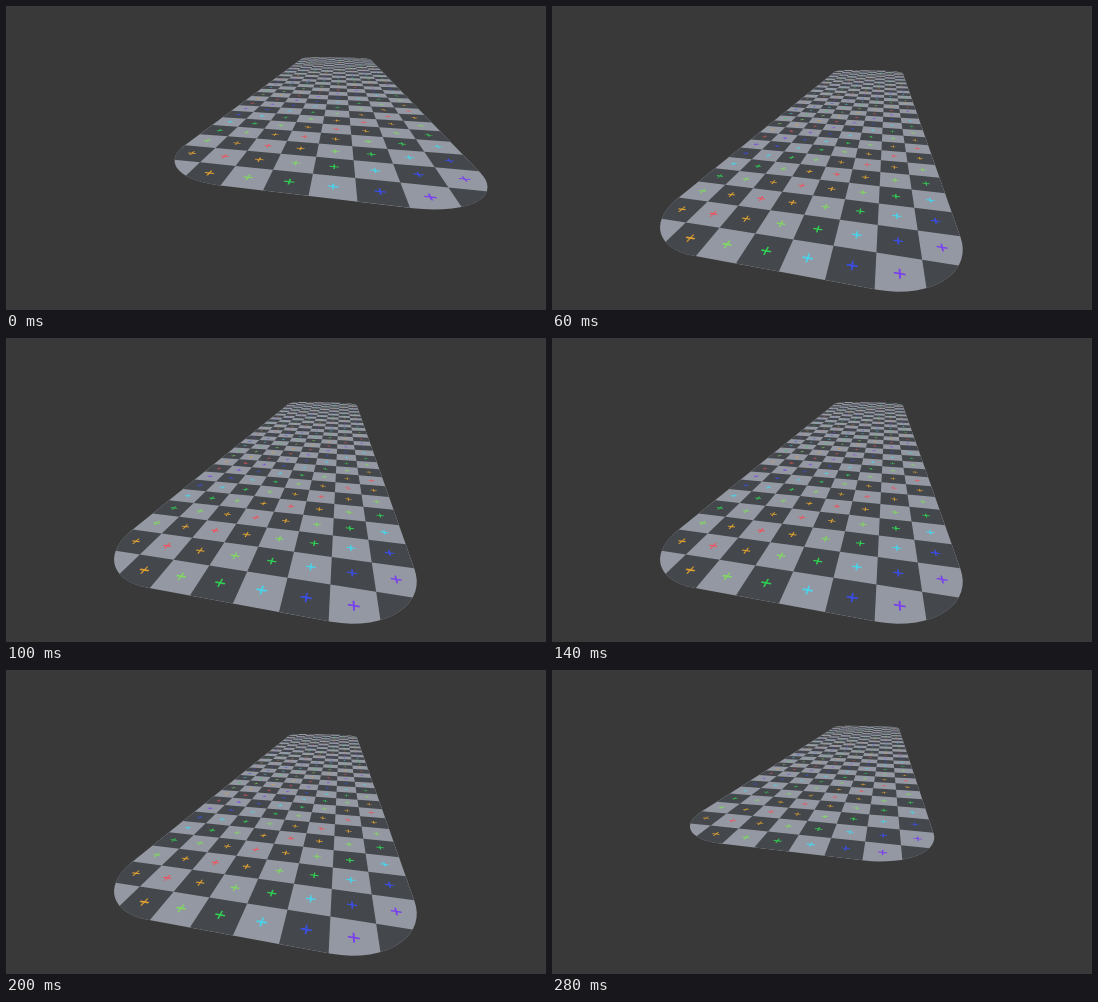
An HTML page with a canvas for the animation above (300 ms loop, 540 px wide and 304 px high).

```html
<!DOCTYPE html>
<html>
<head>
<meta charset="utf-8">
<style>
  html, body { margin: 0; width: 100%; height: 100%; overflow: hidden; background: #393939; }
  canvas { display: block; }
</style>
</head>
<body>
<canvas id="stage" width="540" height="304"></canvas>
<script>
const ctx = document.getElementById('stage').getContext('2d');
const COLS = 8, ROWS = 32, RADIUS = 1.95, JUMP = 56, FOCAL = 270;
const COLORS = ['#f0525c', '#dfa030', '#80d860', '#2fd052', '#48d4ec', '#3a4ee6', '#7a40ee'];
// Camera offset per 20 ms step: bit 1 = right, bit 2 = low, bit 4 = far
const STEPS = [1, 0, 3, 2, 0, 2, 3, 2, 0, 1, 2, 0, 5, 1, 4];
let state = 0;

// Board coordinates (in cells from the near left corner) to the stage
function project(u, v) {
  u -= 0.5;
  v -= 1.5;
  const far = state & 4 ? JUMP / FOCAL : 0;
  const depth = 1 - 0.0259 * u + 0.113 * v + far;
  const x = 130 + 27.06 * u + 37.9 * v + 270 * far + (state & 1 ? JUMP : 0);
  const y = 147.2 - 0.8 * u + 2.63 * v + 152 * far + (state & 2 ? JUMP : 0);
  return [x / depth, y / depth];
}

function addPolygon(points) {
  points.forEach(([u, v], i) => {
    const [x, y] = project(u, v);
    if (i) ctx.lineTo(x, y); else ctx.moveTo(x, y);
  });
  ctx.closePath();
}

function addRect(u, v, w, h) {
  addPolygon([[u, v], [u + w, v], [u + w, v + h], [u, v + h]]);
}

function boardOutline() {
  const points = [];
  for (let corner = 0; corner < 4; corner++) {
    const cu = corner === 0 || corner === 3 ? COLS - RADIUS : RADIUS;
    const cv = corner < 2 ? ROWS - RADIUS : RADIUS;
    for (let i = 0; i <= 16; i++) {
      const a = (corner + i / 16) * Math.PI / 2;
      points.push([cu + RADIUS * Math.cos(a), cv + RADIUS * Math.sin(a)]);
    }
  }
  return points;
}
const OUTLINE = boardOutline();

function eachCell(visit) {
  for (let v = 0; v < ROWS; v++)
    for (let u = 0; u < COLS; u++) visit(u, v);
}

function draw() {
  ctx.fillStyle = '#393939';
  ctx.fillRect(0, 0, 540, 304);
  ctx.save();
  ctx.beginPath();
  addPolygon(OUTLINE);
  ctx.clip();
  ctx.fillStyle = '#9498a2';
  ctx.fillRect(0, 0, 540, 304);

  ctx.fillStyle = '#44474b';
  ctx.beginPath();
  eachCell((u, v) => { if ((u + v) % 2) addRect(u, v, 1, 1); });
  ctx.fill();

  eachCell((u, v) => {
    ctx.fillStyle = COLORS[Math.abs(u - v) % COLORS.length];
    ctx.beginPath();
    addRect(u + 0.38, v + 0.475, 0.24, 0.05);
    addRect(u + 0.48, v + 0.37, 0.04, 0.26);
    ctx.fill();
  });
  ctx.restore();
}

function tick() {
  state = STEPS[Math.floor(performance.now() % 300 / 20)];
  draw();
  requestAnimationFrame(tick);
}
tick();
</script>
</body>
</html>
```
